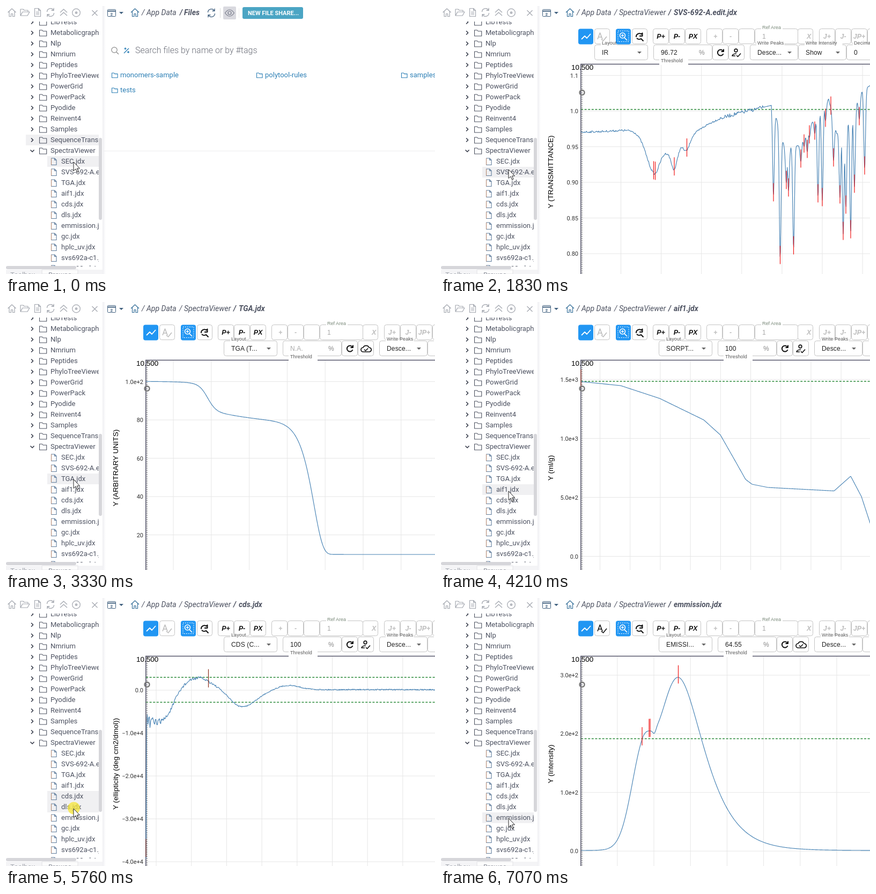
Write an HTML page that moves like this. It is 800 px wide and 500 px high and loops after 7.89 s.

```html
<!DOCTYPE html>
<html lang="en">
<head>
<meta charset="utf-8">
<title>Spectra browser</title>
<style>
  html, body { margin: 0; width: 100%; height: 100%; overflow: hidden; background: #fff; }
  svg { display: block; width: 800px; height: 500px; }
  text { font-family: Roboto, sans-serif; white-space: pre; }
  .arial { font-family: "Liberation Sans", Arial, sans-serif; }
</style>
</head>
<body>
<svg id="stage" viewBox="0 0 800 500"></svg>
<script>
const LOOP = 7890;
const INK = '#4d5261', BLUE = '#2c7fb5', NAVY = '#40607f', STEEL = '#4682b4', PALE = '#a3a7af';

// ---------- drawing helpers (all return SVG markup) ----------
const text = (x, y, s, size, fill, extra = '') =>
  `<text x="${x}" y="${y}" font-size="${size}" fill="${fill}" ${extra}>${s}</text>`;
const arial = (x, y, s, size, fill, extra = '') => text(x, y, s, size, fill, 'class="arial" ' + extra);
const rect = (x, y, w, h, fill, extra = '') =>
  `<rect x="${x}" y="${y}" width="${w}" height="${h}" fill="${fill}" ${extra}/>`;
const line = (x1, y1, x2, y2, stroke, width = 1, extra = '') =>
  `<line x1="${x1}" y1="${y1}" x2="${x2}" y2="${y2}" stroke="${stroke}" stroke-width="${width}" ${extra}/>`;
const path = (d, stroke, width = 1.2) =>
  `<path d="${d}" fill="none" stroke="${stroke}" stroke-width="${width}" stroke-linejoin="round"/>`;
const circle = (x, y, r, stroke, width = 1.2) =>
  `<circle cx="${x}" cy="${y}" r="${r}" fill="none" stroke="${stroke}" stroke-width="${width}"/>`;
const box = (x, y, w) => rect(x + .5, y + .5, w, 28, '#fff', 'rx="4" stroke="#c4c4c4"');
const caret = (x, y, fill) => `<path d="M${x - 4} ${y - 2}h8l-4 4z" fill="${fill}"/>`;
const italic = 'font-style="italic"', boldItalic = 'font-weight="700" ' + italic;

const home = (x, y, c) =>
  path(`M${x} ${y + 7}l7.5-7 7.5 7M${x + 2.5} ${y + 5.5}v9h3.5v-5h3v5h3.5v-9`, c);
const folder = (x, y, c, k = 1) =>
  path(`M${x} ${y}h${5 * k}l${1.6 * k} ${2 * k}h${6.6 * k}v${9 * k}h${-13.2 * k}z`, c, 1.1);
const refresh = (x, y, r, c) =>
  path(`M${x - r} ${y - 1}a${r} ${r} 0 0 1 ${1.85 * r} -${.5 * r}m.5-4v4.5h-4.5
        M${x + r} ${y + 1}a${r} ${r} 0 0 1 ${-1.85 * r} ${.5 * r}m-.5 4v-4.5h4.5`, c, 1.3);

// ---------- sidebar ----------
const PACKAGES = ['LibTests', 'Metabolicgraph', 'Nlp', 'Nmrium', 'Peptides', 'PhyloTreeViewer',
  'PowerGrid', 'PowerPack', 'Pyodide', 'Reinvent4', 'Samples', 'SequenceTranslator', 'SpectraViewer'];
const FILES = ['SEC.jdx', 'SVS-692-A.edit.jdx', 'TGA.jdx', 'aif1.jdx', 'cds.jdx', 'dls.jdx',
  'emmission.jdx', 'gc.jdx', 'hplc_uv.jdx', 'svs692a-c1.jdx', 'svs692a-h1.jdx'];

function treeRows() {
  const packages = PACKAGES.map((name, i) => {
    const y = 30 + 20 * i;
    const arrow = name === 'SpectraViewer' ? `M45.5 ${y - 1.5}l3.5 3.5 3.5-3.5` : `M47 ${y - 3.5}l3.5 3.5-3.5 3.5`;
    return path(arrow, '#3a3f4d', 1.7) + folder(62.5, y - 5, INK) + text(83, y + 4, name, 13, INK);
  });
  const files = FILES.map((name, i) => {
    const y = 290 + 20 * i;
    return path(`M84.5 ${y - 6}h6l3.5 3.5v9h-9.5zM90.5 ${y - 6}v3.5h3.5`, '#5f7c9c', 1.1) +
      line(84.5, y - 6, 84.5, y + 6.5, '#b98a70') + text(103, y + 4, name, 13, INK);
  });
  return packages.concat(files).join('');
}

const sidebarFrame = () =>
  home(3.5, 5, PALE) +
  path('M27 18v-12h5l2 2h7v3M27 18l4-7h13l-4 7z', PALE) +
  path('M53.5 4.5h7l4 4v11h-11zM60.5 4.5v4h4M56 11h6M56 13.5h6M56 16h6', PALE) +
  refresh(83, 12, 6.5, PALE) +
  path('M101 12l6.5-6 6.5 6M101 18l6.5-6 6.5 6', PALE) +
  circle(131, 12.5, 7.3, PALE) + circle(131, 12.5, 1.5, PALE, 1.6) +
  path('M160.5 8l10 10M170.5 8l-10 10', PALE) +
  rect(173, 246, 6, 153, '#d6d6da', 'rx="3"') + rect(0, 485, 131, 6, '#d6d6da', 'rx="3"') +
  rect(0, 492, 180, 8, '#f4f4f6') + rect(67, 492, 67, 8, '#fcfcfc', 'stroke="#e2e2e6"') +
  text(8, 505.5, 'Toolbox', 13, PALE) + text(79, 505.5, 'Browse', 13, '#8d919b') +
  rect(180, 0, 6, 500, 'url(#shade)');

// ---------- ribbon and file list ----------
const ribbon = () =>
  rect(189.5, 6.5, 15, 13, 'none', `stroke="${NAVY}" rx="1"`) + line(189, 9.5, 205, 9.5, NAVY, 2) +
  text(194.6, 18, '2', 8, NAVY, 'font-weight="700"') + caret(215, 13, NAVY) + home(233, 5, '#356f99');

function crumbs(name) {
  const s = text(253, 17, '/', 14, INK, italic) + text(262, 17, 'App Data', 14, INK, italic);
  if (!name) return s + text(324, 17, '/', 14, INK, boldItalic) + text(332, 17, 'Files', 14, INK, boldItalic);
  return s + text(323, 17, '/', 14, INK, italic) + text(332, 17, 'SpectraViewer', 14, INK, italic) +
    text(424, 17, '/', 14, INK, boldItalic) + text(434, 17, name, 14, INK, boldItalic);
}

function browseView() {
  const entry = (x, y, name) => folder(x + .5, y - 4, BLUE, .8) + text(x + 16, y + 4, name, 13, BLUE);
  return refresh(383, 13, 6.5, NAVY) + line(399.5, 4, 399.5, 22, '#ddd') + line(434.5, 4, 434.5, 22, '#eee') +
    rect(405, 1, 24, 24, '#d9d9df', 'rx="2"') +
    path('M408.5 13q8.5-12 17 0q-8.5 12-17 0z', '#777b8a') + circle(417, 13, 3, '#777b8a') +
    rect(441, 2, 113, 22, '#4ba5c4', 'rx="3"') +
    text(451, 17, 'NEW FILE SHARE...', 11, '#fff', 'font-weight="700"') +
    circle(202, 82, 5.2, '#888') + line(206, 86, 210, 90, '#888', 1.3) +
    path('M220 88l9-9M220.5 79.5h4M222.5 77.5v4M226 86h4M228 84v4', BLUE, 1.4) +
    text(241, 88, 'Search files by name or by #tags', 16, '#6b6e78', 'font-weight="300"') +
    entry(197, 129, 'monomers-sample') + entry(467, 129, 'polytool-rules') +
    entry(737, 129, 'samples') + entry(197, 157, 'tests') + line(182, 270.5, 800, 270.5, '#ececee');
}

// ---------- chart toolbar ----------
const field = (x, w, value) => box(x, 72, w) +
  arial(x + 14, 91, value, 12, value === 'N.A.' ? '#aaa' : '#222', 'letter-spacing=".15"');
const label = (x, y, s) => arial(x + 14, y, s, 9, '#555', 'letter-spacing=".1"');
const select = (x, w, name, value) => field(x, w, value) + caret(x + w - 15, 87, '#666') +
  rect(x + 12, 70, name.length * 4.5 + 3, 4, '#fff') + label(x, 72, name);

function toolbar({ layout, threshold, detector, shift = 0, cloud, dark }) {
  const key = (x, s, c) => box(x, 42, 29) + arial(x + 15, 61, s, 12.5, c, 'text-anchor="middle" ' + boldItalic);
  const black = '#111', off = '#bdbdbd', check = dark ? black : off, x = 406 + shift;
  const blueKey = x => rect(x, 42.5, 28, 29, '#2196f3', 'rx="4"');
  const keys = (x0, names, c) => names.map((s, i) => key(x0 + 30 * i, s, c)).join('');
  return blueKey(256) + path('M262 62l6-6 4 4 7-8', '#fff', 1.8) +
    box(286, 42, 28) + path('M292 62l4.5-12 4.5 12M293.5 58h6M299 62l3.5 3 6.5-8', check, 1.6) +
    blueKey(326) + rect(330, 46.5, 20, 20, 'none', 'stroke="#fff" stroke-dasharray="2 2"') +
    circle(338.5, 55, 5, '#fff', 1.6) + path('M342 59l5 5M336 55h5M338.5 52.5v5', '#fff', 1.7) +
    box(356, 42, 28) + path('M364 58a6 6 0 0 1 9.5-5.5l2-2v5.5h-5.5M365 60a6 6 0 0 0 8 1l4.5 4.5', black, 2) +
    keys(395, ['P+', 'P-', 'PX'], black) + keys(495, [' +', '-', ''], off) +
    box(585, 42, 80) + rect(597, 40, 40, 4, '#fff') +
    arial(599, 43, 'Ref Area', 9, '#7b8a7b') + arial(599, 61, '1', 12, '#aaa') +
    box(665, 42, 28) + arial(682, 61, 'X', 12.5, off, boldItalic) +
    keys(705, ['J+', 'J-', 'JP+', ''], off) +
    (detector ? box(297, 72, 98) + arial(310, 100, 'Detector', 12, '#555', 'letter-spacing=".15"') + caret(380, 87, '#666') : '') +
    select(x, 99, 'Layout', layout) +
    field(x + 110, 109, threshold) + arial(x + 195, 90.5, '%', 12, '#888') +
    rect(x + 121, 97, 54, 13, '#fff') + label(x + 110, 105, 'Threshold') +
    box(x + 220, 72, 29) + path(`M${x + 240} 84a5.5 5.5 0 1 0 .5 5M${x + 241} 80.5v4.5h-4.5`, black, 2) +
    box(x + 250, 72, 29) +
    (cloud
      ? path(`M${x + 260} 93a4 4 0 0 1 0-8a6 6 0 0 1 11 0a4 4 0 0 1 .5 8zM${x + 262} 88.5l2.5 2.5 4.5-4.5`, black, 1.7)
      : circle(x + 264, 83, 2.8, black, 1.7) +
        path(`M${x + 265} 89q-7 0-8 4h6M${x + 265} 92l2.5 2.5 5.5-6`, black, 1.7)) +
    select(x + 290, 89, 'Write Peaks', 'Desce...') + select(x + 380, 89, 'Write Intensity', 'Show') +
    select(x + 470, 89, 'Decimal', '0');
}

// ---------- curves: screen y as a function of screen x ----------
let seed = 7;
const random = () => (seed = (seed * 16807) % 2147483647) / 2147483647;
const bell = (x, centre, left, right = left) => Math.exp(-(((x - centre) / (x < centre ? left : right)) ** 2));
const skewed = (x, centre, spread, k) => Math.exp(-((Math.log(1 + (x - centre) / spread) / k) ** 2));
const sigmoid = u => 1 / (1 + Math.exp(-u));
const pairs = s => s.trim().split(/\s+/).map(p => p.split(',').map(Number));
function along(points, x) {
  const i = Math.max(1, points.findIndex(p => p[0] >= x)), [a, b] = [points[i - 1], points[i]];
  return a[1] + (b[1] - a[1]) * (x - a[0]) / (b[0] - a[0]);
}

const sec = x => 472 - 324 * (x < 379 ? skewed(x, 379, 160, .649) : skewed(x, 379, 230, .432));

const IR_TOPS = pairs('617,185 625,208 641,265 668,260 700,203 723,173 738,238 760,215 786,157 801,148');
const IR_DIPS = pairs(`620,353 632.5,470 644,330 648,344 657.5,452 671,290 677,262 683,272 687,245 697,238
  703,355 711,362 717,214 727,186 732,288 744,357 750,425 755,376 764,422 771,337 780,211 790,303`);
function infrared(x) {
  if (x < 617) return 235 - 50 * Math.max(0, (x - 261) / 356) ** 1.8 + 50 * bell(x, 415, 35, 65) +
    48 * bell(x, 397, 20, 12) + 38 * bell(x, 435, 8) + 20 * bell(x, 458, 8);
  const top = along(IR_TOPS, x);
  return Math.max(top, ...IR_DIPS.map(([dip, y]) => top + (y - top) * bell(x, dip, 2.3)));
}

const tga = x => 148 + 52 * sigmoid((x - 376) / 8) + 22 * sigmoid((x - 420) / 35) +
  249 * (1 - Math.exp(-Math.exp((x - 574.5) / 16.5)));

const AIF = pairs(`261,148.5 335,156 408,180 490,220 521,248 550,299 568,331 580,340 610,346 733,352.5
  764,325 784,363 801,415`);

const cds = x => x < 262 ? 472 : 171 + 62 * sigmoid((312 - x) / 8) - 22 * bell(x, 358, 35) +
  32 * bell(x, 440, 30, 38) - 8 * bell(x, 527, 30);

const emission = x => 471 - 323 * (x > 442 ? skewed(x, 442, 100, .546)
  : bell(x, 442, 58) + .38 * bell(x, 374, 30, 24) - .025 * bell(x, 398, 4));

// open: breadcrumb and row change; draw: chart replaces the previous one
const CHARTS = [
  { y: 291, move: [0, 1], click: 630, open: 700, draw: 740,
    layout: 'SEC', threshold: '100', detector: true, dark: true, unit: 'ARBITRARY UNITS',
    gx: [316.5, 73.5], gy: [194.5, 92.5], ticks: ['1.5', '1.0', '0.50', '0.0'], limits: [148],
    curve: sec, noise: x => x < 275 ? 3 : 0, marks: [379.5], markColor: '#94602f' },
  { y: 305, move: [1350, 1490], click: 1690, open: 1760, draw: 1830,
    layout: 'IR', threshold: '96.72', shift: -120, unit: 'TRANSMITTANCE',
    gx: [335.5, 75.1], gy: [129.5, 66.5], ticks: ['1.1', '1.0', '0.95', '0.90', '0.85', '0.80'], limits: [193],
    curve: infrared, noise: x => x < 520 ? 1.8 : x < 600 ? 3.5 : 0,
    marks: [396.5, 399.5, 435, 458.5, ...IR_DIPS.map(d => d[0])], markColor: '#f01414' },
  { y: 331, move: [2200, 2500], click: 2750, open: 2830, draw: 3000,
    layout: 'TGA (T...', threshold: 'N.A.', cloud: true, unit: 'ARBITRARY UNITS',
    gx: [312, 70.8], gy: [148.5, 71.5], ticks: ['1.0e+2', '80', '60', '40', '20'], limits: [],
    curve: tga, marks: [] },
  { y: 353, move: [3330, 3810], click: 4010, open: 4080, draw: 4150,
    layout: 'SORPT...', threshold: '100', unit: 'ml/g',
    gx: [296.5, 56.2], gy: [144.5, 110], ticks: ['1.5e+3', '1.0e+3', '5.0e+2', '0.0'], limits: [148],
    curve: x => along(AIF, x), marks: [261], markColor: '#b04a3a' },
  { y: 371, move: [4560, 4800], click: 5000, open: 5100, draw: 5350,
    layout: 'CDS (C...', threshold: '100', unit: 'ellipticity (deg cm2/dmol)',
    gx: [280, 65.7], gy: [172, 80], ticks: ['0.0', '−1.0e+4', '−2.0e+4', '−3.0e+4', '−4.0e+4'], limits: [148, 194.5],
    curve: cds, noise: x => 1 + 2 * sigmoid((390 - x) / 9) + 20 * Math.exp((261 - x) / 12),
    marks: [261, 377.5], markColor: '#8b2f1c' },
  { y: 393, move: [5480, 5700], click: 5760, open: 5950, draw: 6020,
    layout: 'DLS in...', threshold: '100', unit: 'ARBITRARY UNITS',
    gx: [316.5, 73.5], gy: [194.5, 92.5], ticks: ['15', '10', '5.0', '0.0'], limits: [148],
    curve: x => 472 - 324 * bell(x, 480, 55), marks: [480.5], markColor: '#f01414' },
  { y: 411, move: [6580, 6700], click: 6740, open: 6830, draw: 6920,
    layout: 'EMISSI...', threshold: '64.55', cloud: true, dark: true, unit: 'Intensity',
    gx: [328.8, 68.2], gy: [144, 109.4], ticks: ['3.0e+2', '2.0e+2', '1.0e+2', '0.0'], limits: [262.5],
    curve: emission, marks: [375, 388, 390, 442.5], markColor: '#f01414' },
];

function plot({ curve, noise = () => 0 }) {
  const points = [];
  for (let x = 261; x <= 801; x += x < 617 ? 1.25 : .75)
    points.push(x + ' ' + (curve(x) + (random() * 2 - 1) * noise(x)).toFixed(2));
  return path('M' + points.join('L'), STEEL, 1.15);
}

function chartView(c) {
  let s = '';
  for (let x = c.gx[0]; x < 800; x += c.gx[1]) s += line(x, 109, x, 500, '#e6e6e6');
  c.ticks.forEach((tick, i) => {
    const y = c.gy[0] + i * c.gy[1];
    s += line(261, y, 800, y, '#e6e6e6') + text(256, y + 4, tick, 11, '#333', 'text-anchor="end"');
  });
  s += line(260, 108.5, 800, 108.5, '#55556a', 1.3) + line(260.8, 108, 260.8, 500, '#55556a', 1.6);
  for (const y of c.limits) s += line(261, y, 800, y, '#2b8a3a', 1.4, 'stroke-dasharray="4 2.6"');
  s += plot(c);
  for (const x of c.marks) {
    const y = c.curve(x) - 5.5;
    s += line(x, y - 17, x, y + 17, c.markColor, 1.2);
  }
  return s + line(263, 109, 263, 500, '#777', 1.2, 'stroke-dasharray="2 2"') + circle(263, 161.5, 4.5, '#777', 2.4) +
    toolbar(c) + arial(243, 119, '10.500', 13.5, '#000') +
    arial(0, 0, `Y (${c.unit})`, 13.6, '#000', 'text-anchor="middle" transform="translate(209 309.5) rotate(-90)"');
}

// ---------- stage ----------
const layer = (id, body) => `<g id="${id}">${body}</g>`;
const el = id => document.getElementById(id);
el('stage').innerHTML = `<defs>
    <linearGradient id="shade"><stop stop-color="#efeff2"/><stop offset="1" stop-color="#fff"/></linearGradient>
    <clipPath id="tree"><rect y="29" width="173" height="457"/></clipPath></defs>` +
  '<g clip-path="url(#tree)">' + rect(37, 240, 136, 20, '#f0f0f2', 'id="selected"') +
  rect(77, 280, 96, 20, '#f0f0f2', 'id="hovered"') + treeRows() + '</g>' + sidebarFrame() + ribbon() +
  layer('crumb0', crumbs()) + CHARTS.map((c, i) => layer('crumb' + (i + 1), crumbs(FILES[i]))).join('') +
  layer('view0', browseView()) + CHARTS.map((c, i) => layer('view' + (i + 1), chartView(c))).join('') +
  '<circle id="click" r="11.5" fill="#f5e636" fill-opacity=".75"/>' +
  '<path id="cursor" d="M0 0V16.5L4 13L6.5 19L9 18L6.5 12H11.5Z" fill="#fff" stroke="#222"/>';

// ---------- animation ----------
const progress = (t, [from, to]) => Math.min(1, Math.max(0, (t - from) / (to - from)));
const pointerY = t => CHARTS.reduce((y, c) => y + (c.y - y) * progress(t, c.move), CHARTS[0].y);
const show = (id, visible) => { el(id).style.display = visible ? '' : 'none'; };
function set(id, attrs) {
  for (const name in attrs) el(id).setAttribute(name, attrs[name]);
}

function draw(t) {
  const opened = CHARTS.filter(c => t >= c.open).length;
  const drawn = CHARTS.filter(c => t >= c.draw).length;
  const x = 126, y = pointerY(t);
  for (let i = 0; i <= CHARTS.length; i++) {
    show('crumb' + i, i === opened);
    show('view' + i, i === drawn);
  }
  set('selected', opened ? { x: 77, y: 260 + 20 * opened, width: 96 } : { x: 37, y: 240, width: 136 });
  set('hovered', { y: Math.floor(y / 20) * 20 });
  set('cursor', { transform: `translate(${x} ${y})` });
  set('click', { cx: x + .5, cy: y - 1 });
  show('click', CHARTS.some(c => t >= c.click && t < c.open));
}

const start = performance.now();
function tick() {
  draw((performance.now() - start) % LOOP);
  requestAnimationFrame(tick);
}
tick();
</script>
</body>
</html>
```
